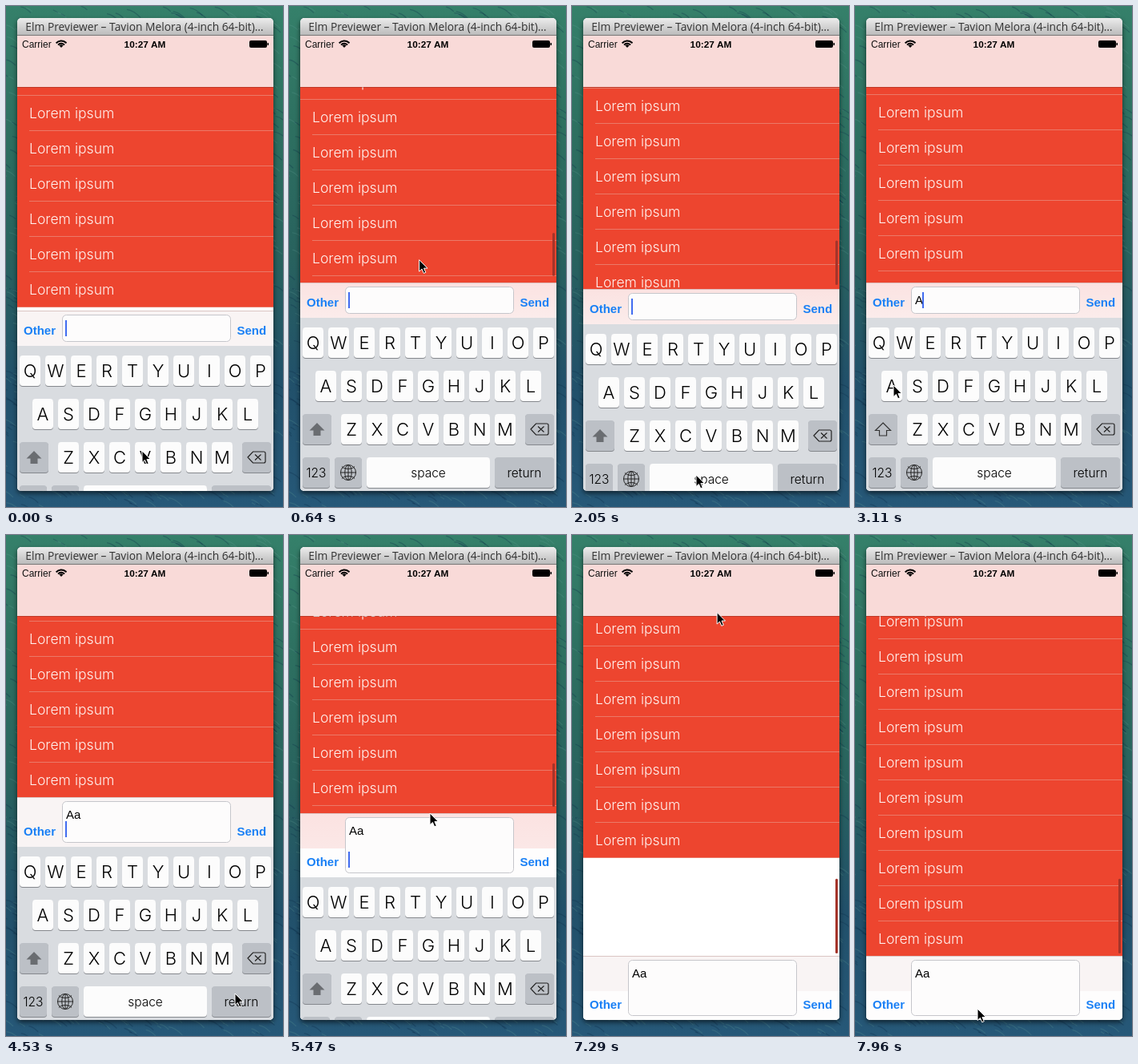
Recreate the animation shown at these times as an HTML page with a canvas. Size 346 px wide and 625 px high, loop 8 s.

```html
<!DOCTYPE html>
<html lang="en">
<head>
<meta charset="utf-8">
<title>Chat list</title>
<style>
html, body { margin: 0; width: 100%; height: 100%; overflow: hidden; background: #245a60; }
canvas { display: block; width: 346px; height: 625px; }
</style>
</head>
<body>
<canvas id="stage"></canvas>
<script>
const W = 346, H = 625, LOOP = 8000;
const LEFT = 14, RIGHT = 334, TOP = 101, BOTTOM = 605, ROW = 44, KEYS = 216;
const SANS = '"Liberation Sans", Arial, sans-serif';
const THIN = 'Inter, "Liberation Sans", sans-serif';
const canvas = document.getElementById('stage');
const dpr = window.devicePixelRatio || 1;
canvas.width = W * dpr;
canvas.height = H * dpr;
const c = canvas.getContext('2d');
c.scale(dpr, dpr);

// Motion
const smooth = p => p * p * (3 - 2 * p);
const out = p => 1 - (1 - p) ** 3;
const linear = p => p;
const clamp = (v, lo, hi) => Math.min(hi, Math.max(lo, v));
const step = (t, from, to, ease = smooth) => ease(clamp((t - from) / (to - from), 0, 1));

// Pointer moves: start, finish, x, y
const moves = [
  [60, 420, 163, 282], [500, 1100, 160, 530], [1320, 1650, 155, 585], [2300, 2860, 48, 473],
  [3530, 3820, 286, 572], [4840, 5120, 176, 275], [5200, 5900, 176, 491], [6420, 6540, 176, 573],
  [6720, 6830, 186, 440], [7000, 7400, 180, 20], [7500, 7940, 153, 591]
];
// Each session: a tap raises the keyboard, a drag pulls it down with the list.
const sessions = [
  { tap: -196, grab: 500, drop: 1100, grip: 63 },
  { tap: 1760, grab: 5200, drop: 5900, grip: 34 }
];
const typing = { first: 3060, second: 3530, enter: 3990, enterAgain: 4550 };

function pointer(t) {
  let x = 170, y = 555;
  for (const [from, to, nx, ny] of moves) {
    const p = step(t, from, to);
    x += (nx - x) * p;
    y += (ny - y) * p;
  }
  return { x, y };
}

function pose(t) {
  const late = t >= sessions[1].tap;
  const { tap, grab, drop, grip } = sessions[+late];
  const h = 44 + 18 * (step(t, typing.enter, 4250) + step(t, typing.enterAgain, 4790));
  const rise = step(t, tap, tap + 435, out);
  let edge = BOTTOM - KEYS * rise, end;
  if (t < grab) {
    const dip = 17 * Math.sin(Math.PI * step(t, tap, tap + 740, linear));
    const gap = late ? 29 + 3 * (1 - rise) - dip : -32 * (1 - rise);
    end = edge - h + gap * (1 - step(t, typing.enter, 4250));
  } else {
    const held = pointer(Math.min(t, drop)).y;
    edge = clamp(held + h, BOTTOM - KEYS, BOTTOM);
    edge += (BOTTOM - edge) * step(t, drop, drop + 110);
    end = held + grip - 150 * step(t, 7000, 7400) * (1 - step(t, 7480, 7800, out));
  }
  edge = Math.round(edge);
  return { ...pointer(t), h, edge, bar: Math.round(edge - h), end: Math.round(end), focused: t < drop };
}

function thumbAlpha(t) {
  const shown = (from, to) => step(t, from, from + 60) * (1 - step(t, to - 240, to));
  return shown(550, 2800) + shown(5200, 6250) + shown(7020, 8400);
}

// Drawing helpers
function rect(x, y, w, h, fill) { c.fillStyle = fill; c.fillRect(x, y, w, h); }
function round(x, y, w, h, r, fill, stroke) {
  c.beginPath();
  c.roundRect(x, y, w, h, r);
  if (fill) { c.fillStyle = fill; c.fill(); }
  if (stroke) { c.strokeStyle = stroke; c.lineWidth = 1; c.stroke(); }
}
function text(s, x, y, font, fill, align = 'left') {
  c.font = font;
  c.fillStyle = fill;
  c.textAlign = align;
  c.fillText(s, x, y);
}
function shape(d, x, y, fill, stroke, width = 1) {
  const p = new Path2D(d);
  c.save();
  c.translate(x, y);
  if (fill) { c.fillStyle = fill; c.fill(p); }
  if (stroke) { c.strokeStyle = stroke; c.lineWidth = width; c.stroke(p); }
  c.restore();
}
function arc(x, y, rx, ry, from, to, width, color) {
  c.beginPath();
  c.ellipse(x, y, rx, ry, 0, from * Math.PI, to * Math.PI);
  c.strokeStyle = color;
  c.lineWidth = width;
  c.stroke();
}
function fade(y0, y1, ...colors) {
  const g = c.createLinearGradient(0, y0, 0, y1);
  colors.forEach((k, i) => g.addColorStop(i / (colors.length - 1), k));
  return g;
}

let seed = 7;
const rnd = () => (seed = seed * 16807 % 2147483647) / 2147483647;
const waves = Array.from({ length: 1100 }, () => ({
  x: rnd() * W - 8, y: rnd() * H, len: 4 + rnd() * 14, tint: rnd() < .5 ? '#0c2c4850' : '#6aa69a38'
}));

function wallpaper() {
  rect(0, 0, W, H, fade(0, H, '#35806a', '#2d6f60', '#28625e', '#21506a', '#265878'));
  c.lineWidth = 1.2;
  for (const w of waves) {
    c.strokeStyle = w.tint;
    c.beginPath();
    c.moveTo(w.x, w.y);
    c.quadraticCurveTo(w.x + w.len / 2, w.y + 1, w.x + w.len, w.y + w.len * .6);
    c.stroke();
  }
}

function list({ bar, end }, alpha) {
  rect(LEFT, TOP, 320, BOTTOM - TOP, '#fff');
  rect(LEFT, TOP, 320, end + 1 - TOP, '#ed452f');
  for (let i = 0, y = end; y > TOP - ROW; i++, y -= ROW) {
    const x = i % 6 ? 29 : LEFT;
    rect(x, y, RIGHT - x, 1, '#ea7968');
    text('Lorem ipsum', 29, y - 15, '300 17.6px ' + THIN, '#fff3f0');
  }
  if (alpha) {
    const len = .22 * (bar - TOP), foot = bar - 3 - Math.max(0, end - bar) * .15;
    c.globalAlpha = alpha;
    round(329, foot - len, 3, len, 1.5, '#a5342a');
    c.globalAlpha = 1;
  }
}

function header() {
  rect(LEFT, 37, 320, 64, '#f9dad8');
  rect(LEFT, TOP, 320, 1, '#0003');
  text('Carrier', 20, 51.5, '12px ' + SANS, '#111');
  text('10:27 AM', 173.5, 51.5, 'bold 11.8px ' + SANS, '#000', 'center');
  for (const r of [8.5, 5.2]) arc(69, 52, r, r, -.77, -.23, 2, '#000');
  shape('M0 0L-2.6 -2.8Q0 -4.6 2.6 -2.8Z', 69, 52, '#000');
  round(304, 43, 22, 9, 2, '#000');
  rect(326.5, 46, 1.5, 3, '#000');
}

function inputBar({ h, bar, edge, end, focused }, t) {
  rect(LEFT, bar, 320, h, '#f9f4f4');
  if (end > bar) rect(LEFT, bar, 320, h, fade(bar, edge, '#fbe2e1', '#fbeceb'));
  if (h > 62) rect(LEFT, bar + 44, 320, h - 44, '#fefdfd');
  rect(LEFT, bar, 320, .6, '#c9a7a4');
  round(70.5, bar + 5.5, 210, h - 11, 5, '#fdfcfc', '#c6c6cb');
  text('Other', 22, edge - 14.5, 'bold 15px ' + SANS, '#1a80f5');
  text('Send', 288.5, edge - 14.5, 'bold 15px ' + SANS, '#1a80f5');

  const typed = 'Aa'.slice(0, (t >= typing.first) + (t >= typing.second));
  text(typed, 75, bar + 27, '15px ' + SANS, '#000');
  const line = (t >= typing.enter) + (t >= typing.enterAgain);
  if (focused) rect(74 + (line ? 0 : typed.length * 10), bar + 12 + line * 18, 2, 20, '#416cf0');
}

function key(x, y, w, label = '', size = 15.5, fill = '#fcfcfc') {
  round(x, y + 1, w, 38, 4, '#85888d');
  round(x, y, w, 38, 4, fill);
  text(label, x + w / 2, y + 19 + size * .37, `300 ${size}px ${THIN}`, '#000', 'center');
}

function globe(x, y) {
  for (const rx of [9.5, 4.2]) arc(x, y, rx, 9.5, 0, 2, 1, '#222');
  arc(x, y - 10, 9, 5.5, .15, .85, 1, '#222');
  arc(x, y + 10, 9, 5.5, 1.15, 1.85, 1, '#222');
  shape('M-9.5 0H9.5M0 -9.5V9.5', x, y, null, '#222');
}

function keyboard(top, t) {
  const dark = '#bcc0c6';
  rect(LEFT, top, 320, KEYS, '#d9dce0');
  ['QWERTYUIOP', 'ASDFGHJKL', 'ZXCVBNM'].forEach((row, r) => {
    const x = 177 - 16 * row.length;
    [...row].forEach((k, i) => key(x + 32 * i, top + 12 + 54 * r, 26, k, 22));
  });
  const y3 = top + 120, y4 = top + 174;
  for (const x of [17, 295]) key(x, y3, 36, '', 0, dark);
  key(17, y4, 34, '123', 15.5, dark);
  key(57, y4, 34, '', 0, dark);
  key(97, y4, 154, 'space');
  key(257, y4, 74, 'return', 15.5, dark);

  const lower = t >= typing.first && t < typing.enter;
  shape('M0 -8L9.5 1.5H4.5V8H-4.5V1.5H-9.5Z', 35, y3 + 19, lower ? null : '#6a6d71', lower ? '#333' : null, 1.2);
  shape('M-11 0L-4.5 -7H9Q11 -7 11 -5V5Q11 7 9 7H-4.5ZM-2 -3.5L5.5 3.5M5.5 -3.5L-2 3.5', 313, y3 + 19, null, '#222', 1.2);
  globe(74, y4 + 19);
}

function titleBar() {
  round(LEFT, 15, 320, 30, [5, 5, 0, 0], fade(15, 37, '#ececec', '#b9b9b9'));
  rect(LEFT, 36, 320, 1, '#777');
  text('Elm Previewer – Tavion Melora (4-inch 64-bit)…', 173, 31, '13.8px "Open Sans", "Noto Sans", sans-serif', '#333', 'center');
}

function draw(t) {
  const p = pose(t);
  wallpaper();
  c.save();
  c.shadowColor = '#0009';
  c.shadowBlur = 6 * dpr;
  c.shadowOffsetY = 3 * dpr;
  round(LEFT, 15, 320, 590, 5, '#fff');
  c.restore();

  c.save();
  c.beginPath();
  c.roundRect(LEFT, 15, 320, 590, 5);
  c.clip();
  list(p, thumbAlpha(t));
  inputBar(p, t);
  if (p.edge < BOTTOM) keyboard(p.edge, t);
  titleBar();
  header();
  c.restore();

  shape('M0 0V14.5L3.4 11.4L5.7 16.8L8.2 15.7L5.9 10.5H10.4Z', p.x, p.y, '#000', '#fff');
}

function tick(now) {
  draw(now % LOOP);
  requestAnimationFrame(tick);
}
draw(0);
requestAnimationFrame(tick);
</script>
</body>
</html>
```
